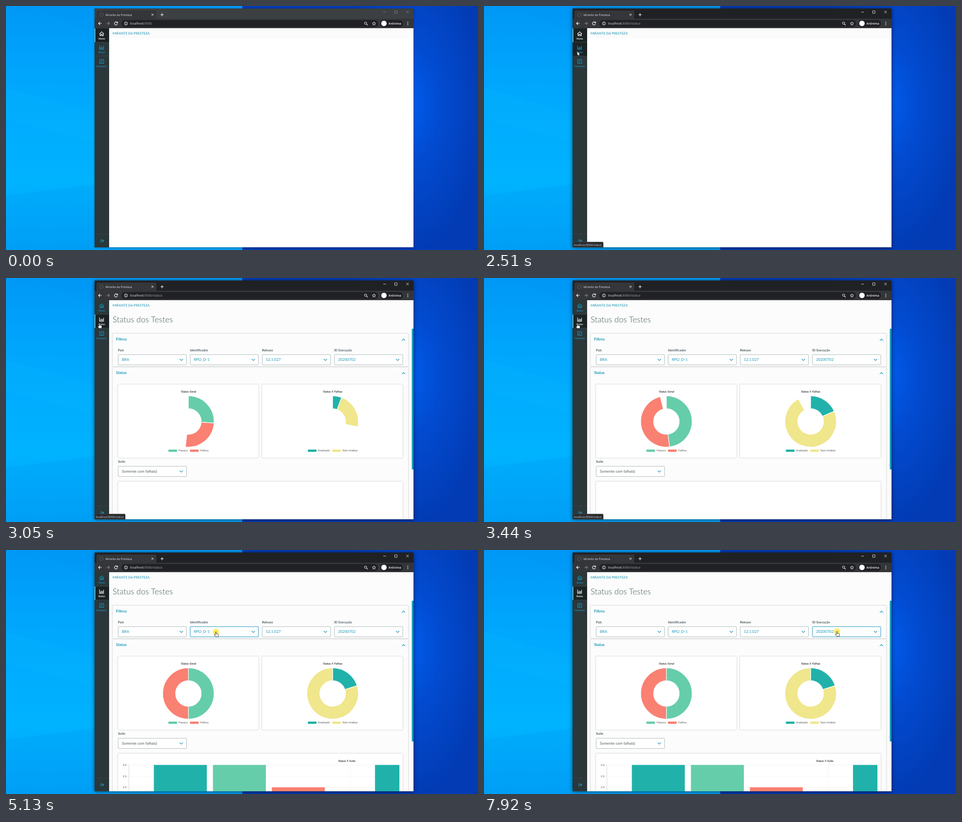
These frames come from a looping animation (1039x539 px, 8 s). An HTML page:

```html
<!DOCTYPE html>
<html lang="pt">
<head>
<meta charset="utf-8">
<title>Mirante da Presteza</title>
<style>
html, body { margin: 0; width: 100%; height: 100%; overflow: hidden; background: #00a6fb }
svg { display: block; width: 1039px; height: 539px }
text { text-rendering: geometricPrecision; font-family: Lato, "Open Sans", sans-serif }
.ui { font-family: "Open Sans", "Noto Sans", sans-serif }
.ch { font-family: "Liberation Sans", Arial, sans-serif; fill: #555; font-size: 6px }
.mid { text-anchor: middle }
.line { fill: none; stroke: currentColor }
.card { filter: drop-shadow(0 .7px 1px rgba(0,0,0,.32)) }
</style>
</head>
<body>
<svg id="stage" viewBox="0 0 1039 539"></svg>
<script>
const TEAL = '#1593b5', NAME = 'Mirante da Presteza';
const stage = document.getElementById('stage');
const $ = id => document.getElementById(id);
const text = (x, y, size, str, attrs = '') => `<text x="${x}" y="${y}" style="font-size:${size}px" ${attrs}>${str}</text>`;
const rect = (x, y, w, h, fill, attrs = '') => `<rect x="${x}" y="${y}" width="${w}" height="${h}" fill="${fill}" ${attrs}/>`;
const line = (d, w = 1, attrs = '') => `<path class="line" d="${d}" stroke-width="${w}" ${attrs}/>`;

const icons = {
  home: line('M205.6 61.6L210.6 57L215.6 61.6M207 60.6V65.6H209.4V62.4H211.8V65.6H214.2V60.6', 1.2),
  chart: line('M206 87.3V96H215.5M208.4 95V91.5M210.5 95V90M212.6 95V91M214.7 95V88', 1.2),
  list: line('M206.3 118.3H215V126.6H206.3ZM208.3 121H213M208.3 123.6H211.5', 1.1)
};
const nav = (id, y, icon, label) => `<g id="${id}">
  ${rect(195, y, 32, 30.5, '#1b2224', `id="${id}Bg"`)}${rect(195, y, 1.5, 30.5, '#8fd6e0', `id="${id}Mark"`)}
  ${icon}${text(210.6, y + 24.3, 5.3, label, 'class="mid" fill="currentColor" font-weight="700"')}</g>`;
const chevron = (x, y, up) => line(`M${x - 3.6} ${y + (up ? 2 : -1.8)}l3.6 ${up ? -3.8 : 3.6}l3.6 ${up ? 3.8 : -3.6}`, 1.2, `color="${TEAL}"`);
const select = (id, x, y, label, value, color = TEAL) =>
  text(x - .5, y - 7.8, 7.1, label, 'fill="#4a5c60" font-weight="700"') +
  rect(x, y, 150.3, 22.5, '#fff', `id="${id}" stroke="#aeb7ba" rx="1"`) +
  text(x + 8, y + 13.6, 8.3, value, `fill="${color}"`) + chevron(x + 139, y + 11.2);
const legend = (x, color, label, tx) => rect(x, 379, 19, 5, color) + text(tx, 383.4, 6, label, 'class="ch"');
const menu = (id, x, value) => `<g id="${id}" class="card">${rect(x, 192.5, 150.3, 26, '#fff', 'stroke="#d2d8da" stroke-width=".6"')}
  ${text(x + 8, 208, 8.3, value, `fill="${TEAL}"`)}</g>`;
const bar = (id, x, w, color) => rect(x, 0, w, 0, color, `id="${id}"`);
const spokes = [...Array(8).keys()].map(i =>
  `<path d="M0 -2.8V-4.6" stroke="#4a5c60" stroke-opacity="${.3 + i * .08}" transform="rotate(${i * 45})"/>`).join('');

stage.innerHTML = `
<defs>
  <linearGradient id="sky" x1="0" y1="0" x2="0" y2="1">
    <stop offset="0" stop-color="#0098f6"/><stop offset=".35" stop-color="#00a8fd"/>
    <stop offset=".72" stop-color="#00b3ff"/><stop offset="1" stop-color="#00a2f8"/></linearGradient>
  <radialGradient id="deep" gradientUnits="userSpaceOnUse" cx="890" cy="215" r="330" gradientTransform="translate(890 0) scale(.5 1) translate(-890 0)">
    <stop offset="0" stop-color="#005cec"/><stop offset=".4" stop-color="#024bd0"/><stop offset="1" stop-color="#023bb4"/></radialGradient>
  <clipPath id="view"><rect x="195" y="49" width="702" height="484"/></clipPath>
</defs>
${rect(0, 0, 520, 539, 'url(#sky)')}
<path d="M0 418L195 394V539H0Z" fill="#0094ee" opacity=".22"/>
<path d="M0 180L195 238V300L0 250Z" fill="#10b8ff" opacity=".12"/>
<path d="M60 0L195 60V0Z" fill="#0090ee" opacity=".2"/>
${rect(520, 0, 519, 539, 'url(#deep)')}
${rect(195, 5.5, 702, 527.5, '#202124', 'id="frame"')}
<g class="chrome" color="#fff">
  <path d="M199 29V13q0-3 3-3H328q3 0 3 3V29Z" fill="#35363a"/>
  ${rect(195, 28, 702, 21, '#35363a')}
  <circle cx="210.2" cy="19.2" r="3.8" fill="none" stroke="#5b5d61"/>
  ${text(219, 21.6, 6.3, NAME, 'class="ui" fill="#e8eaed"')}
  ${line('M320.3 17l4.4 4.4M324.7 17l-4.4 4.4')}
  ${line('M340 19.2h7M343.5 15.7v7', 1.1)}
  <g id="buttons">${line('M830.5 13.5h5.6M855.5 10.8h5.4v5.4h-5.4zM881 10.5l5.6 5.6M886.6 10.5l-5.6 5.6', .8)}</g>
  ${line('M210.5 38.5h-6.8M207 35.2l-3.3 3.3l3.3 3.3', 1.2)}
  ${line('M221 38.5h6.8M224.5 35.2l3.3 3.3l-3.3 3.3', 1.1, 'color="#85878b"')}
  ${line('M245 36.6A3.4 3.4 0 1 0 245.4 39.6M245.6 34.8v2.5h-2.6', 1.2)}
  ${rect(254, 31, 565, 15.5, '#202124', 'rx="7.7"')}
  <circle cx="264" cy="38.6" r="3.5" class="line"/>${line('M264 38v2.4M264 36.2v1')}
  <text x="273" y="41.1" class="ui" style="font-size:7.2px" fill="#e8eaed">localhost<tspan fill="#9aa0a6">:8066<tspan id="path"></tspan></tspan></text>
  <circle cx="791.6" cy="37.9" r="2.5" class="line"/>${line('M793.5 39.8l2.7 2.7', 1.2)}
  ${line('M810 35l1.1 2.4l2.6 .3l-1.9 1.8l.5 2.6l-2.3-1.3l-2.3 1.3l.5-2.6l-1.9-1.8l2.6-.3z', .9)}
  ${rect(824, 31, 50, 15.5, '#202124', 'rx="7.7"')}
  <circle cx="832" cy="38.6" r="6" fill="#fff"/>
  ${text(842, 40.9, 6.4, 'Anônima', 'class="ui" fill="#fff" font-weight="600"')}
  ${[35.6, 38.6, 41.6].map(y => `<circle cx="884.5" cy="${y}" r=".95" fill="#fff"/>`).join('')}
</g>
<g clip-path="url(#view)">
  ${rect(227, 49, 670, 484, '#fff')}
  ${rect(227, 49, 670, 23, '#fbfbfb')}
  <g id="page">
    ${rect(227, 49, 670, 484, '#fcfcfc')}
    ${text(234.5, 97.6, 18, 'Status dos Testes', 'fill="#44575c" font-weight="300"')}
    ${rect(234.5, 122.5, 651, 73, '#fcfcfc', 'class="card"')}
    ${rect(234.5, 197, 651, 360, '#fcfcfc', 'class="card"')}
    ${text(242.3, 138, 8.4, 'Filtros', `fill="${TEAL}" font-weight="700"`)}${chevron(875, 136.3, 1)}
    ${text(242.3, 211.8, 8.4, 'Status', `fill="${TEAL}" font-weight="700"`)}${chevron(875, 210.3, 1)}
    ${select('country', 247, 169.3, 'País', 'BRA')}
    ${select('ident', 405.4, 169.3, 'Identificador', 'RPO_D-1')}
    ${select('release', 564, 169.3, 'Release', '12.1.027')}
    ${select('run', 723, 169.3, 'ID Execução', '20200702')}
    ${rect(246.5, 235, 309.5, 162, '#fff', 'class="card"')}
    ${rect(563.5, 235, 310, 162, '#fff', 'class="card" id="card2"')}
    <g id="pie1">
      ${text(401.8, 253.2, 6, 'Status Geral', 'class="ch mid" stroke="#555" stroke-width=".2"')}
      <g id="ring1"></g>
      ${legend(357.5, '#66cdaa', 'Passou', 380)}${legend(405, '#fa8072', 'Falhou', 427.5)}
    </g>
    <g id="pie2">
      ${text(719, 253.2, 6, 'Status X Falhas', 'class="ch mid" stroke="#555" stroke-width=".2"')}
      <g id="ring2"></g>
      ${legend(664.5, '#20b2aa', 'Analisado', 686.5)}${legend(718, '#f0e68c', 'Sem Análise', 740.5)}
    </g>
    <g id="suite">${select('suiteBox', 247, 416, 'Suíte', 'Somente com falha(s)', '#4a5c60')}</g>
    ${rect(246.5, 449.5, 627, 120, '#fff', 'class="card" id="card3"')}
    <g id="bars">
      ${text(750, 468.2, 6, 'Status X Suite', 'class="ch mid" stroke="#555" stroke-width=".2"')}
      <path d="M266 474.8H866M266 499.5H866M266 524.5H866M757.5 475V533" stroke="#eee" stroke-width=".7"/>
      <path d="M270.5 474.8V533" stroke="#ccc" stroke-width=".8"/>
      ${['3.0', '2.5', '2.0'].map((n, i) => text(257, 476.8 + i * 24.8, 6, n, 'class="ch"')).join('')}
      ${bar('b0', 325.5, 116.5, '#20b2aa')}${bar('b1', 455.5, 116.5, '#66cdaa')}
      ${bar('b2', 585.3, 116.5, '#fa8072')}${bar('b3', 812.3, 53.7, '#20b2aa')}
    </g>
    ${rect(893.3, 112, 3.7, 311, '#1199b8', 'id="scroll" rx="1"')}
    ${menu('menu1', 405.4, 'RPO_D-1')}${menu('menu2', 564, '12.1.027')}
  </g>
  ${text(234.5, 63.2, 7.35, NAME.toUpperCase(), `fill="${TEAL}"`)}
  ${rect(195, 49, 32, 484, '#2c3739')}
  ${nav('home', 49.5, icons.home, 'Home')}${nav('status', 80, icons.chart, 'Status')}${nav('compare', 110.6, icons.list, 'Comparar')}
  <path d="M195 80.3h32M195 110.6h32M195 503.3h32" stroke="#414c4e" stroke-width=".8"/>
  ${line('M207.5 516h4.6M207.5 518.6h7.6M207.5 521.2h4.6M213 516.2l2.4 2.4l-2.4 2.4', 1.1, 'color="#1496c8"')}
  <g id="loading">
    ${rect(195, 49, 702, 484, '#002e3e', 'opacity=".7"')}
    ${rect(496.5, 265, 99, 52, '#fff', 'rx="1.5"')}
    <g id="spin">${spokes}</g>
    ${text(545.5, 300.2, 6.1, 'Carregando', 'class="mid" fill="#4a5c60"')}
  </g>
</g>
<g id="bubble">
  <path id="bubbleBox" fill="#292a2d" stroke="#4b4d50" stroke-width=".7"/>
  <text id="bubbleText" class="ui" x="197.5" y="529.6" style="font-size:6.2px" fill="#d5d8db"></text>
</g>
<g id="cursor">
  <circle id="click" r="7" fill="#ffe100" opacity=".6"/>
  <path id="arrow" d="M0 0V9.2L2.1 7.3L3.6 10.6L5.2 9.9L3.8 6.7H6.6Z" fill="#fff" stroke="#111" stroke-width=".7"/>
  <path id="hand" d="M-1 .3Q0-1 1 .3V4L4.8 4.8Q6 5.2 5.8 6.8L5 10.8H-.6L-3.6 6.8Q-3.3 5.2-1 6.6Z" fill="#fff" stroke="#111" stroke-width=".8"/>
</g>`;

const clamp = u => Math.max(0, Math.min(1, u));
const outQuart = u => 1 - (1 - clamp(u)) ** 4;
const show = (id, on) => $(id).style.display = on ? '' : 'none';
const set = (id, name, value) => $(id).setAttribute(name, value);
const within = (t, ...spans) => spans.some(([a, b]) => t >= a && t < b);

// time, x, y, easing power of the move that ends here (0 = smooth in and out)
const path = [[480, 964, 536, 1], [1270, 260, 17, 0], [1350, 260, 17, 1], [2120, 205, 100, 0], [3370, 205.5, 100.5, 1],
  [3830, 207, 102, 1], [4220, 207, 102, 1], [4290, 255, 140, 1], [4370, 308, 166, 1], [4900, 462, 181, 2],
  [6070, 462, 181, 1], [6300, 582, 179, 1], [6600, 598, 181, 2], [7150, 598, 181, 1], [7540, 777, 180, 0], [8000, 777, 180, 1]];
function pointer(t) {
  const i = Math.max(1, path.findIndex(p => p[0] > t));
  const [t0, x0, y0] = path[i - 1], [t1, x1, y1, power] = path[i];
  const u = clamp((t - t0) / (t1 - t0));
  const k = power ? 1 - (1 - u) ** power : u * u * (3 - 2 * u);
  return [x0 + (x1 - x0) * k, y0 + (y1 - y0) * k];
}

function slice(cx, from, to, color) {
  const at = (r, turn) => `${cx + r * Math.sin(turn * 2 * Math.PI)} ${317 - r * Math.cos(turn * 2 * Math.PI)}`;
  const big = to - from > .5 ? 1 : 0;
  return `<path d="M${at(56.5, from)}A56.5 56.5 0 ${big} 1 ${at(56.5, to)}L${at(28.3, to)}A28.3 28.3 0 ${big} 0 ${at(28.3, from)}Z" fill="${color}" stroke="#fff" stroke-width="1.2"/>`;
}
const ring = (id, cx, split, grown, colors) =>
  $(id).innerHTML = slice(cx, 0, split * grown, colors[0]) + slice(cx, split * grown, Math.min(grown, .9999), colors[1]);

function draw(t) {
  const [x, y] = pointer(t), over = (l, top, r, b) => x >= l && x < r && y >= top && y < b;
  const active = t >= 1350, opened = t >= 2590, early = t < 3050;

  set('frame', 'fill', active ? '#202124' : '#3c4043');
  $('frame').style.filter = `drop-shadow(0 1px ${active ? 4 : 2}px rgba(0,0,0,${active ? .6 : .4}))`;
  set('buttons', 'opacity', active ? 1 : .4);
  $('path').textContent = t >= 2280 ? '/status' : '';

  const tops = { home: 49.5, status: 80, compare: 110.6 };
  for (const id in tops) {
    const chosen = id === (opened ? 'status' : 'home');
    const hover = t >= 480 && over(195, tops[id], 227, tops[id] + 30.5);
    $(id).style.color = chosen ? '#fff' : '#1496c8';
    show(id + 'Mark', chosen);
    show(id + 'Bg', chosen || hover);
  }

  show('page', opened);
  show('loading', opened && early);
  set('spin', 'transform', `translate(545.5 283) rotate(${Math.floor(t / 125) * 45})`);
  set('suite', 'transform', early ? 'translate(317 -69)' : '');
  set('card2', 'height', early ? 93 : 162);
  set('card3', 'y', early ? 409 : 449.5);
  set('card3', 'height', early ? 160 : 120);
  set('scroll', 'height', early ? 336 : 311);
  show('pie1', t >= 2890);
  show('pie2', !early);
  ring('ring1', 401.5, .5, outQuart(early ? .0185 : (t - 2884) / 1000), ['#66cdaa', '#fa8072']);
  ring('ring2', 719, .2, outQuart((t - 2971) / 1000), ['#20b2aa', '#f0e68c']);

  show('bars', t >= 4220);
  const grown = outQuart((t - 4180) / 190);
  [3, 3, 2, 3].forEach((value, i) => {
    const h = value * 49.4 * grown;
    set('b' + i, 'y', 623 - h);
    set('b' + i, 'height', h);
  });

  const focus = { ident: within(t, [5130, 6840]), release: within(t, [6760, 7850]), run: t >= 7850 };
  for (const [id, left] of [['country', 247], ['ident', 405], ['release', 564], ['run', 723]])
    set(id, 'stroke', focus[id] || over(left, 169, left + 151, 192) ? '#1593c0' : '#aeb7ba');
  show('menu1', within(t, [5380, 6070]));
  show('menu2', within(t, [6840, 7150]));

  const compare = t >= 4290;
  show('bubble', within(t, [2220, 4900]));
  set('bubble', 'opacity', opened && early ? .45 : 1);
  $('bubbleText').textContent = 'localhost:8066/' + (compare ? 'compare' : 'status');
  set('bubbleBox', 'd', `M195 521.3H${compare ? 269 : 260.5}q2 0 2 2V533H195Z`);

  const hand = !within(t, [2280, 2590]) && (over(195, 49, 227, 141) || (opened && over(247, 169, 874, 192)));
  show('cursor', t >= 480);
  set('cursor', 'transform', `translate(${x} ${y})`);
  show('hand', hand);
  show('arrow', !hand);
  show('click', within(t, [1270, 1350], [2220, 2280], [5130, 5380], [5910, 6070], [6760, 6840], [7070, 7150], [7850, 8000]));
}

function tick() {
  draw(performance.now() % 8000);
  requestAnimationFrame(tick);
}
tick();
</script>
</body>
</html>
```
